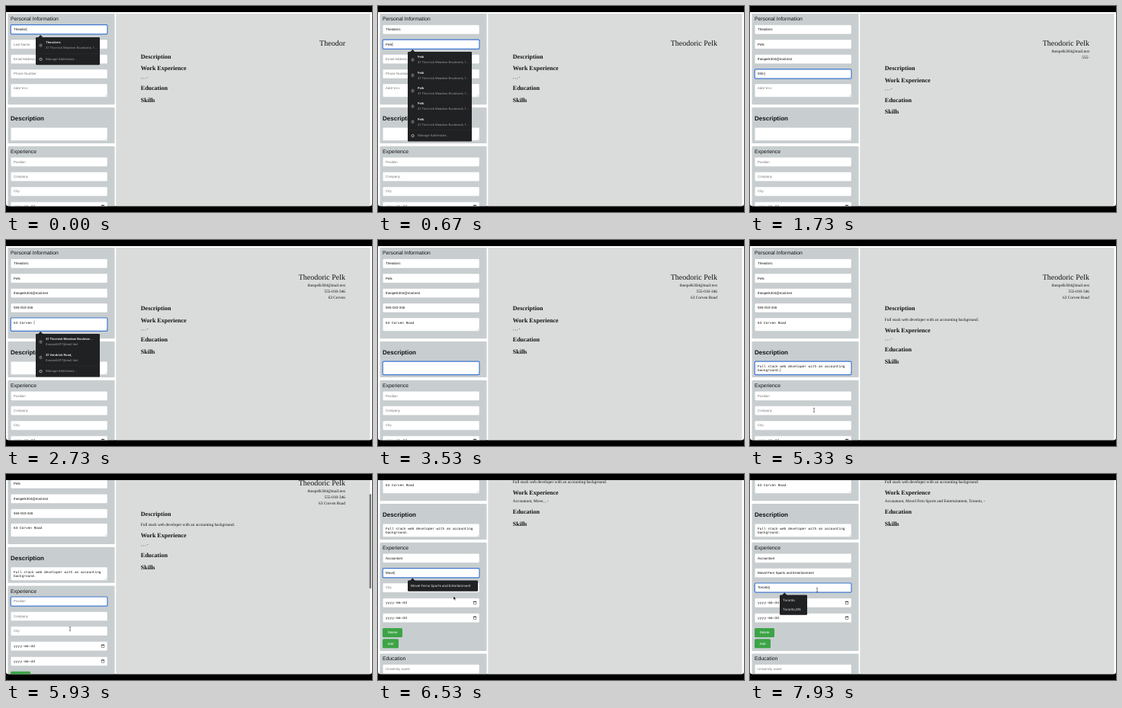
These frames come from a looping animation (480x270 px, 8000 ms). An HTML page with a canvas:

```html
<!DOCTYPE html>
<html lang="en">
<head>
<meta charset="utf-8">
<title>Resume builder</title>
<style>
html, body { margin: 0; width: 100%; height: 100%; overflow: hidden; background: #000; }
canvas { display: block; width: 480px; height: 270px; }
</style>
</head>
<body>
<canvas id="stage"></canvas>
<script>
const LOOP = 8000;
const SANS = '"Liberation Sans", sans-serif';
const SERIF = '"Liberation Serif", serif';
const MONO = '"Liberation Mono", monospace';
const MENU = 'Inter, sans-serif';
const INK = '#111', GREY = '#757575', BLUE = '#3f78d0';

const canvas = document.getElementById('stage');
const scale = Math.max(1, window.devicePixelRatio || 1);
canvas.width = 480 * scale;
canvas.height = 270 * scale;
const c = canvas.getContext('2d');

// Each run types `text` evenly between two times.
const typing = {
  first: [['Theodoric', -360, 100]],
  last: [['Pelk', 370, 600]],
  email: [['theopelk304@mail.test', 920, 1450]],
  phone: [['555-010-346', 1540, 2030]],
  address: [['63 Corven Road', 2200, 2900]],
  about: [['Full stack web developer with an accounting background.', 4245, 5290]],
  position: [['Accountant', 6090, 6340]],
  company: [['Move', 6390, 6520], ['l ', 6590, 6720], ['Fern Sports and Entertainment', 6910, 7480]],
  city: [['Toronto', 7780, 7910]]
};
const focusOrder = [[0, 'first'], [330, 'last'], [800, 'email'], [1500, 'phone'], [2100, 'address'],
  [3270, 'about'], [5400, 'position'], [6370, 'company'], [7640, 'city']];
const scrollKeys = [[5600, 0], [5930, 37], [6200, 94]];
const mouseKeys = [[5250, 84, 229], [5600, 84, 203], [5950, 84, 203], [6400, 99, 162], [7050, 99, 162], [7500, 88, 152]];

function typed(name, t) {
  return typing[name].map(([text, start, end]) => {
    const part = Math.min(1, Math.max(0, (t - start) / (end - start)));
    return text.slice(0, Math.floor(part * text.length + 1e-6));
  }).join('');
}

function keyed(keys, t, i = 1) {
  if (t <= keys[0][0]) return keys[0][i];
  for (let k = 1; k < keys.length; k++) {
    const a = keys[k - 1], b = keys[k];
    if (t < b[0]) return a[i] + (b[i] - a[i]) * (t - a[0]) / (b[0] - a[0]);
  }
  return keys[keys.length - 1][i];
}

// Text placed by the vertical centre of its capitals.
function text(str, x, y, size, family, color = INK, weight = 400, align = 'left') {
  c.font = `${weight} ${size}px ${family}`;
  c.fillStyle = color;
  c.textAlign = align;
  c.fillText(str, x, y + size * 0.33);
}

function box(x, y, w, h, r, fill, stroke, line = 0.4) {
  c.beginPath();
  c.roundRect(x, y, w, h, r);
  if (fill) { c.fillStyle = fill; c.fill(); }
  if (stroke) { c.strokeStyle = stroke; c.lineWidth = line; c.stroke(); }
}

function path(points, color, width = 0.5, fill) {
  c.beginPath();
  points.forEach(([x, y]) => c.lineTo(x, y));
  if (fill) { c.closePath(); c.fillStyle = fill; c.fill(); }
  c.strokeStyle = color;
  c.lineWidth = width;
  c.stroke();
}

function caret(x, y) {
  path([[x + 0.4, y - 2.4], [x + 0.4, y + 2.4]], '#222', 0.45);
}

function fieldBox(y, h, focused) {
  box(6.2, y, 126.8, h, 1.4, '#fff', focused ? BLUE : '#b9bdbf', focused ? 1.2 : 0.4);
}

function input(y, hint, value = '', focused = false) {
  fieldBox(y - 6, 12.2, focused);
  text(value || hint, 10, y, 4.44, SANS, value ? INK : GREY);
  if (focused && value) caret(10 + c.measureText(value).width, y);
}

function textarea(y, hint, value, focused) {
  fieldBox(y, 17.4, focused);
  const lines = [''];
  value.split(/(?<= )/).forEach(word => {
    if ((lines.at(-1) + word).trimEnd().length > 44) lines.push('');
    lines[lines.length - 1] += word;
  });
  if (!value) text(hint, 10, y + 6, 4.44, MONO, GREY);
  lines.forEach((line, i) => text(line, 10, y + 6.2 + i * 5.1, 4.44, MONO));
  if (focused && value) caret(10 + c.measureText(lines.at(-1)).width, y + 6.2 + (lines.length - 1) * 5.1);
  for (const d of [1, 2.2]) path([[132 - d, y + 16.4], [132, y + 16.4 - d]], '#888', 0.3);
}

function dateInput(y) {
  fieldBox(y - 6, 12.2);
  c.letterSpacing = '0.13px';
  text('yyyy-mm-dd', 10, y, 4.44, MONO);
  c.letterSpacing = '0px';
  box(125.2, y - 1.8, 3.6, 3.6, 0.4, null, '#222', 0.5);
  path([[125.2, y - 1.3], [128.8, y - 1.3]], '#222', 0.8);
}

function button(label, y, w) {
  box(6, y, w, 12, 1.5, '#3da446');
  text(label, 6 + w / 2, y + 6, 4.4, SANS, '#fff', 400, 'center');
}

function card(y, h) {
  box(2.5, y, 140, h, 1, '#c8ced0');
}

function menuFrame(y, w, h) {
  path([[42, y + 0.5], [45.3, y - 3], [48.6, y + 0.5]], '#202123', 0.2, '#202123');
  box(39, y, w, h, 1.2, '#202123');
}

function addressMenu(y, rows) {
  const bottom = y + rows.length * 20.3 + 1;
  menuFrame(y, 84, rows.length * 20.3 + 16);
  rows.forEach(([title, detail], i) => {
    const top = y + i * 20.3;
    text(title, 52, top + 7, 4, MENU, '#f1f1f1', 600);
    text(detail, 52, top + 14, 4, MENU, '#9b9c9e');
    box(44, top + 8.8, 3, 3.6, 1.5, null, '#ccc', 0.5);
    box(45, top + 10, 1, 1, 0.5, '#ccc');
  });
  path([[39, bottom], [123, bottom]], '#303134', 0.4);
  text('Manage Addresses...', 52, bottom + 7.4, 4.1, MENU, '#9b9c9e');
  box(44, bottom + 5.9, 3.2, 3.2, 1.6, null, '#ccc', 0.8);
}

function listMenu(y, w, rows) {
  menuFrame(y, w, 2.2 + rows.length * 12);
  rows.forEach((row, i) => text(row, 43, y + 7.2 + i * 12, 4.35, MENU, '#eee'));
}

function form(v, focus) {
  card(10, 119.3);
  text('Personal Information', 6, 17, 6.8, SANS);
  input(30.7, 'First Name', v.first, focus === 'first');
  input(50.1, 'Last Name', v.last, focus === 'last');
  input(69.5, 'Email Address', v.email, focus === 'email');
  input(88.9, 'Phone Number', v.phone, focus === 'phone');
  textarea(102, 'Address', v.address, focus === 'address');

  card(133, 47);
  text('Description', 6, 147.5, 8, SANS, INK, 700);
  textarea(159.2, '', v.about, focus === 'about');

  card(183.7, 142.3);
  text('Experience', 6, 190.7, 6.8, SANS);
  input(204.2, 'Position', v.position, focus === 'position');
  input(223.6, 'Company', v.company, focus === 'company');
  input(243, 'City', v.city, focus === 'city');
  dateInput(262.8);
  dateInput(282.6);
  button('Delete', 296, 26);
  button('Add', 310.3, 21);

  card(329.5, 160);
  text('Education', 6, 336, 6.8, SANS);
  input(349.5, 'University name');
}

function resume(v) {
  box(144.3, 10, 333.2, 500, 0.5, '#d9dcdb');
  text((v.first + ' ' + v.last).trim(), 445, 48.6, 10, SERIF, INK, 400, 'right');
  const contacts = [v.email, v.phone, v.address].filter(Boolean);
  contacts.forEach((line, i) => text(line.trim(), 445, 59.2 + i * 7.9, 5.33, SERIF, INK, 400, 'right'));

  const heading = (label, y) => text(label, 176.8, y, 8, SERIF, INK, 700);
  let y = 66 + contacts.length * 7.85;
  heading('Description', y);
  if (v.about) text(v.about, 176.8, y + 14.2, 5.33, SERIF);
  y += v.about ? 28.5 : 15.7;
  heading('Work Experience', y);
  text(`${v.position}, ${v.company}, ${v.city}, -`, 176.8, y + 11.2, 5.33, SERIF);
  heading('Education', y + 25.5);
  heading('Skills', y + 41.3);
}

function menus(v, focus, t) {
  const street = '41 Thornick Meadow Boulevar';
  if (t < 270) addressMenu(41, [['Theodoric', street + 'd, 1...']]);
  if (focus === 'last' && v.last && t < 730)
    addressMenu(60, Array(5).fill(['Pelk', street + 'd, 1...']));
  if (focus === 'address' && v.address && t < 3060) {
    const mail = 'theopelk917@mail.test';
    addressMenu(123, [[street + '...', mail], ['41 Vendrick Road,', mail]]);
  }
  const club = 'Movel Ferns Sports and Entertainment';
  if (focus === 'company' && v.company && club.startsWith(v.company)) listMenu(233.5, 92, [club]);
  if (focus === 'city' && v.city) listMenu(252.6, 36, ['Toronto', 'Toronto,ON']);
}

function pointer(t) {
  if (t < 5050) return;
  const x = keyed(mouseKeys, t), y = keyed(mouseKeys, t, 2);
  if (t > 6300 && t < 7450) {
    path([[x, y - 2], [x, y + 3], [x + 1.2, y + 2], [x + 2, y + 3.8], [x + 2.8, y + 3.4],
      [x + 2, y + 1.7], [x + 3.5, y + 1.6]], '#fff', 0.4, '#111');
  } else {
    path([[x, y - 2.6], [x, y + 2.6]], '#222', 0.6);
    for (const d of [-2.6, 2.6]) path([[x - 0.9, y + d], [x + 0.9, y + d]], '#222', 0.5);
  }
}

function draw(t) {
  const v = {};
  for (const name in typing) v[name] = typed(name, t);
  const focus = focusOrder.filter(([start]) => start <= t).pop()[1];
  const scroll = keyed(scrollKeys, t);

  c.setTransform(scale, 0, 0, scale, 0, 0);
  c.textRendering = 'geometricPrecision';
  c.fillStyle = '#000';
  c.fillRect(0, 0, 480, 270);
  c.save();
  c.beginPath();
  c.roundRect(0, 8, 480, 254.3, [0, 0, 3, 3]);
  c.clip();
  c.fillStyle = '#fff';
  c.fillRect(0, 0, 480, 270);
  c.save();
  c.translate(0, -scroll);
  form(v, focus);
  resume(v);
  menus(v, focus, t);
  c.restore();
  if (t > 5600 && t < 6480) box(476.6, 8 + scroll * 0.488, 2.4, 124, 1.2, '#777');
  pointer(t);
  c.restore();
}

function tick() {
  draw(performance.now() % LOOP);
  requestAnimationFrame(tick);
}
tick();
</script>
</body>
</html>
```
